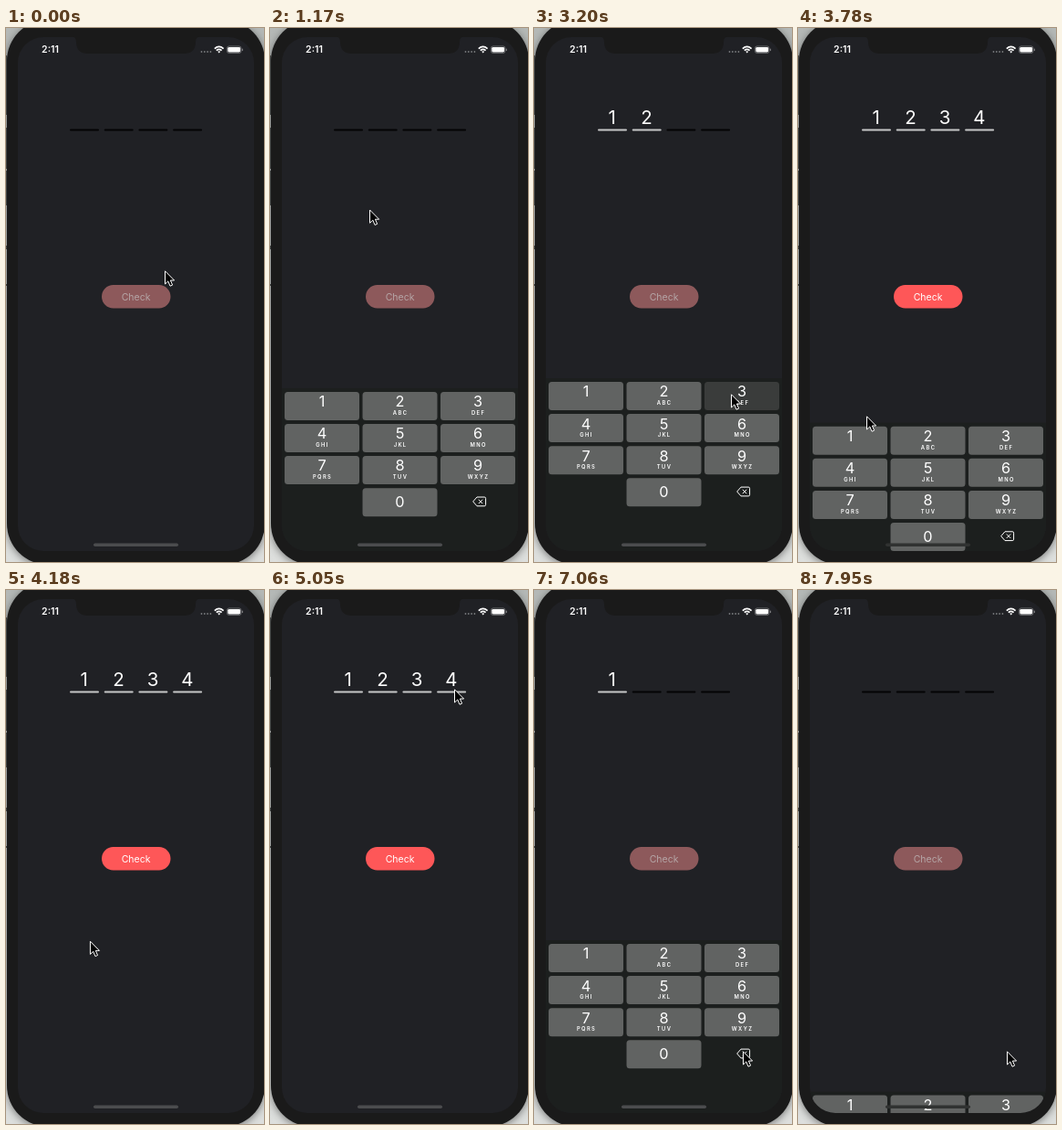
These frames come from a looping animation (283 px wide and 584 px high, 8 s). An HTML page:

```html
<!DOCTYPE html>
<html lang="en">
<head>
<meta charset="utf-8">
<title>Pin code entry</title>
<style>
  html, body { margin: 0; width: 100%; height: 100%; overflow: hidden; background: #d3d5d3; }
  svg { display: block; width: 283px; height: 584px; }
  text { font-family: Inter, Roboto, sans-serif; fill: #fff; text-anchor: middle; }
  .body { filter: drop-shadow(0 2px 4px rgba(0, 0, 0, .45)); }
  .digit { font-size: 20.5px; }
  .num { font-size: 16.3px; }
  .sub { font-size: 5.8px; font-weight: 600; letter-spacing: 1.4px; }
</style>
</head>
<body>
<svg id="stage" viewBox="0 0 283 584">
  <defs>
    <linearGradient id="wall" x2="0" y2="1">
      <stop offset="0" stop-color="#b4b8b6"/>
      <stop offset="1" stop-color="#dddfdd"/>
    </linearGradient>
    <clipPath id="screen"><rect x="13" y="10" width="259" height="562" rx="28"/></clipPath>
  </defs>
  <rect width="283" height="584" fill="url(#wall)"/>
  <path d="M0 30h1v42h-1zM0 72h1v23h-1zM0 109h1v45h-1zM0 156h1v38h-1zM0 238h1v4h-1zM0 280h1v2h-1z" fill="#555857"/>
  <rect class="body" x="1" y="-9" width="283" height="596" rx="45" fill="#1a1a1a"/>
  <g clip-path="url(#screen)">
    <rect x="13" y="10" width="259" height="562" fill="#202125"/>
    <g id="slots"></g>
    <rect id="button" x="105" y="281" width="75.5" height="25.5" rx="12.75"/>
    <text id="label" x="142.6" y="298" font-size="10.5">Check</text>
    <g id="keyboard">
      <rect x="13" y="383" width="259" height="201" fill="#1c1f1e"/>
    </g>
    <rect id="home" x="96" y="563.5" width="93" height="3.4" rx="1.7"/>
  </g>
  <path d="M72 9Q77 10 77 15Q77 28 90 28H195Q208 28 208 15Q208 10 213 9Z" fill="#1a1a1a"/>
  <text x="48.5" y="27" font-size="10.5" font-weight="600">2:11</text>
  <g id="dots" fill="#77797c"></g>
  <g fill="none" stroke="#fff" stroke-width="1.7">
    <path d="M228.8 22.6Q233.6 18.2 238.6 22.6M230.8 24.6Q233.6 22.2 236.6 24.6"/>
    <path d="M233.7 27.4l-1.5-1.6q1.5-1.2 3 0z" fill="#fff" stroke="none"/>
  </g>
  <rect x="242.4" y="20" width="15.6" height="7.4" rx="2.2" fill="none" stroke="#7d7e80" stroke-width=".8"/>
  <rect x="243.3" y="20.9" width="13.8" height="5.6" rx="1.4" fill="#fff"/>
  <rect x="258.8" y="22.4" width="1" height="2.6" rx=".5" fill="#8b8c8e"/>
  <path id="cursor" d="M.5 .8V15L3.8 11.9L6 17.2L8.6 16.1L6.4 11H10.6Z"
        fill="#000" stroke="#fff" stroke-width="1" stroke-linejoin="round"/>
</svg>
<script>
const LOOP = 8000, FPS = 17;
const $ = id => document.getElementById(id);

function add(parent, tag, attrs, text) {
  const el = document.createElementNS('http://www.w3.org/2000/svg', tag);
  for (const k in attrs) el.setAttribute(k, attrs[k]);
  if (text) el.textContent = text;
  parent.append(el);
  return el;
}

for (let i = 0; i < 4; i++) {
  add($('dots'), 'circle', { cx: 214.5 + i * 3.3, cy: 26, r: 0.9 });
}

const slots = [0, 1, 2, 3].map(i => {
  const x = 70 + i * 37.7;
  return {
    line: add($('slots'), 'rect', { x, y: 110.6, width: 32, height: 2, rx: 1 }),
    digit: add($('slots'), 'text', { x: x + 15.7, y: 105, class: 'digit' }, i + 1)
  };
});

const letters = ['', 'ABC', 'DEF', 'GHI', 'JKL', 'MNO', 'PQRS', 'TUV', 'WXYZ'];
const keyboard = $('keyboard');

function addKey(num, col, row, sub) {
  const x = 16 + col * 85.5, y = 387 + row * 35.1;
  const cap = add(keyboard, 'rect', { x, y, width: 82, height: 31, rx: 3.5, fill: '#616362' });
  add(keyboard, 'text', { x: x + 41, y: y + (num ? 16.4 : 21), class: 'num' }, String(num));
  if (sub) add(keyboard, 'text', { x: x + 41.6, y: y + 25.2, class: 'sub' }, sub);
  return cap;
}

const keys = letters.map((sub, i) => addKey(i + 1, i % 3, Math.floor(i / 3), sub));
addKey(0, 1, 3);
const eraser = add(keyboard, 'path', {
  d: 'M222.7 507L227 502.1H235.2Q236.6 502.1 236.6 503.5V510.5Q236.6 511.9 235.2 511.9H227Z',
  stroke: '#fff', 'stroke-width': 1, 'stroke-linejoin': 'round'
});
const cross = add(keyboard, 'path', { d: 'M228.8 504.8l4.4 4.4m0-4.4l-4.4 4.4', 'stroke-width': 1 });

// Pointer path: time, x, y
const path = [
  [0, 174, 265], [60, 174, 265], [340, 142, 336], [770, 85, 104],
  [1015, 85, 104], [1186, 109, 198], [1600, 123, 363], [1715, 123, 363],
  [2069, 75, 401], [2490, 75, 401], [2760, 148, 398], [2900, 148, 398],
  [3150, 216, 400], [3320, 216, 400], [3550, 75, 424], [3960, 75, 424],
  [4770, 191, 143], [5069, 202, 108], [5310, 202, 108],
  [5930, 229, 504], [LOOP, 229, 504]
];

function slope(i, c) {
  const a = path[i - 1], b = path[i], d = path[i + 1];
  if (!a || !d || (b[c] - a[c]) * (d[c] - b[c]) <= 0) return 0;
  return (d[c] - a[c]) / (d[0] - a[0]);
}

function pointer(t) {
  let i = 0;
  while (i < path.length - 2 && t >= path[i + 1][0]) i++;
  const a = path[i], b = path[i + 1], h = b[0] - a[0];
  const u = Math.min(1, (t - a[0]) / h), v = 1 - u;
  return [1, 2].map(c =>
    a[c] * v * v * (1 + 2 * u) + b[c] * u * u * (3 - 2 * u) +
    h * u * v * (v * slope(i, c) - u * slope(i + 1, c)));
}

const presses = [[2340, 2460], [2760, 2880], [3180, 3300], [3550, 3670]];
const erases = [[6090, 6210], [6510, 6690], [6860, 7040], [7750, 7870]];
const within = (t, [from, to]) => t >= from && t < to;

// Vertical keyboard offset; 200 is fully hidden
function drop(t) {
  const rise = from => 22.6 * Math.exp((from - t) / 50);
  const fall = from => {
    const x = (t - from) * 0.0158;
    return 200 * (1 - (1 + x) * Math.exp(-x));
  };
  if (t < 1150) return 200;
  if (t < 3715) return rise(1150);
  if (t < 5370) return fall(3715);
  if (t < 7749) return rise(5370);
  return fall(7749);
}

function draw(time) {
  const t = Math.floor((time + 10) * FPS / 1000) * 1000 / FPS + 10;
  const count = presses.filter(p => t >= p[1]).length - erases.filter(e => t >= e[0]).length;

  slots.forEach((s, i) => {
    const on = i < count;
    s.digit.setAttribute('visibility', on ? 'visible' : 'hidden');
    s.line.setAttribute('fill', on ? '#c6c7c8' : '#040405');
  });
  const ready = count === 4;
  $('button').setAttribute('fill', ready ? '#fe5758' : '#8d595b');
  $('label').style.fill = ready ? '#fff' : '#b5a5a6';

  const y = drop(t), shown = y < 187;
  keyboard.setAttribute('transform', `translate(0 ${y.toFixed(2)})`);
  keyboard.setAttribute('visibility', shown ? 'visible' : 'hidden');
  presses.forEach((p, i) => keys[i].setAttribute('fill', within(t, p) ? '#3a3c3b' : '#616362'));
  const held = erases.some(e => within(t, e));
  eraser.setAttribute('fill', held ? '#fff' : 'none');
  cross.setAttribute('stroke', held ? '#1c1f1e' : '#fff');
  $('home').setAttribute('fill', shown && y > 30 ? '#303231' : '#4b4c4e');

  $('cursor').setAttribute('transform', `translate(${pointer(t).map(n => n.toFixed(2)).join(' ')})`);
}

function tick() {
  draw(performance.now() % LOOP);
  requestAnimationFrame(tick);
}
tick();
</script>
</body>
</html>
```
